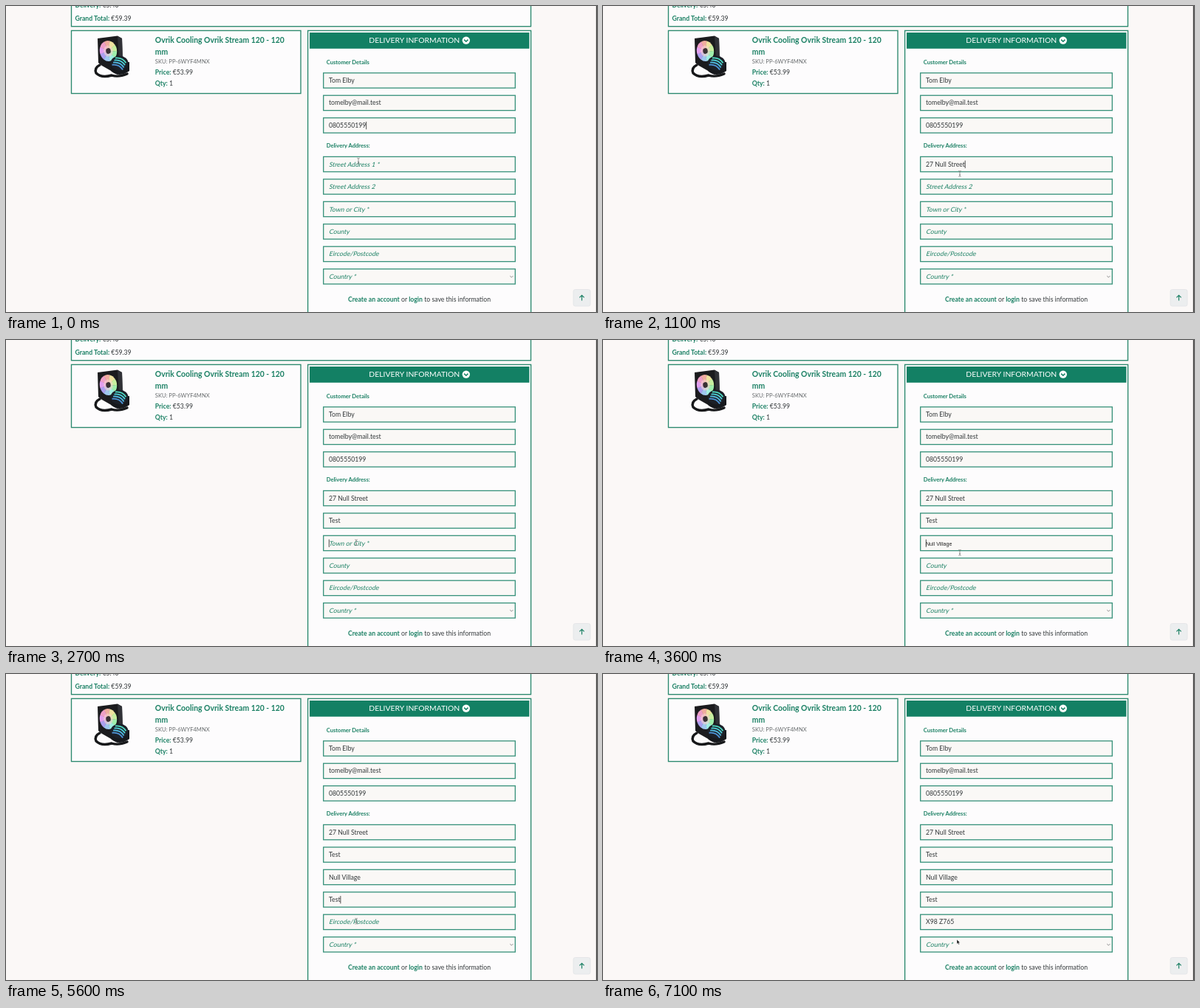
An HTML page for the animation above (8000 ms loop, 800 by 415 pixels).

```html
<!DOCTYPE html>
<html lang="en">
<head>
<meta charset="utf-8">
<title>Checkout form</title>
<style>
  html, body { margin: 0; width: 100%; height: 100%; overflow: hidden; background: #fbf8f7; }
  svg { display: block; width: 100vw; height: 100vh; }
  text { font: 8.7px Lato, sans-serif; fill: #33383a; white-space: pre; }
  .b, .title { font-weight: 700; fill: #1b8064; }
  .title { font-size: 10.4px; }
  .head { font-size: 10.4px; fill: #fff; text-anchor: middle; }
  .small { font-size: 7.6px; }
  .sku { font-size: 7.6px; fill: #686c6e; }
  .hint { fill: #1b8064; }
  .preview { font: 7.1px "Liberation Sans", Arial, sans-serif; fill: #222; }
  .card { fill: #fdfcfd; stroke: #2b896e; stroke-width: 1.35; }
  .input { fill: #faf8f6; stroke: #36917a; stroke-width: 1.3; }
  .caret { stroke: #222; stroke-width: .8; }
</style>
</head>
<body>
<svg viewBox="0 0 800 415" preserveAspectRatio="none">
  <rect width="800" height="415" fill="#fbf8f7"/>
  <rect x="798.8" width="1.2" height="415" fill="#3c3c3c"/>

  <rect class="card" x="88.5" y="-10" width="622" height="37.7"/>
  <text x="93.5" y="2.3"><tspan class="b">Delivery:</tspan> €5.40</text>
  <text x="93.5" y="19.6"><tspan class="b">Grand Total:</tspan> €59.39</text>

  <rect class="card" x="88.5" y="33.4" width="310.5" height="85.2"/>
  <path d="M127 80Q119 84 122 91Q129 98 143 94Q152 97 164 92" fill="none" stroke="#17181a" stroke-width="3.4" stroke-linecap="round"/>
  <path d="M124 44L151 40.5L157 44L158 75L151 93L130 81L125 77Z" fill="#1b1b1e"/>
  <path d="M151 41L157 44L158 75L153 74Z" fill="#303136"/>
  <g id="fan" transform="translate(138.5 61) rotate(-8) scale(.9 1.08)"/>
  <path d="M142 78V88Q153 98 167 88V76Z" fill="#17191d"/>
  <ellipse cx="153.5" cy="77.5" rx="12" ry="10" fill="#1c2028"/>
  <g id="pump" transform="translate(153.5 77.5) rotate(25)" fill="none" stroke-width="1.8"/>

  <text class="title" x="201.8" y="50">Ovrik Cooling Ovrik Stream 120 - 120</text>
  <text class="title" x="201.8" y="65.8">mm</text>
  <text class="sku" x="201.8" y="78.3">SKU: PP-6WYF4MNX</text>
  <text x="201.8" y="93"><tspan class="b">Price:</tspan> €53.99</text>
  <text x="201.8" y="108.2"><tspan class="b">Qty:</tspan> 1</text>

  <rect class="card" x="408.6" y="33.4" width="302" height="400"/>
  <rect x="411" y="36" width="297.4" height="21.8" fill="#138064"/>
  <text class="head" x="552.8" y="50.4">DELIVERY INFORMATION</text>
  <circle cx="622.8" cy="46.6" r="5.2" fill="#fff"/>
  <path d="M620.2 45.6l2.6 2.6l2.6-2.6" fill="none" stroke="#138064" stroke-width="1.5"/>
  <text class="b small" x="433.7" y="78.6">Customer Details</text>
  <text class="b small" x="433.7" y="192.2">Delivery Address:</text>
  <g id="form"></g>
  <path d="M682.2 366l2.1 2.1l2.1-2.1" fill="none" stroke="#777" stroke-width=".8"/>
  <text x="559.5" y="400.5" text-anchor="middle"><tspan class="b">Create an account</tspan> or <tspan class="b">login</tspan> to save this information</text>

  <rect x="768" y="384.5" width="23" height="22.5" rx="2.5" fill="#eceeef" stroke="#e2e4e6" stroke-width=".8"/>
  <path d="M779.5 399.5v-7.2M776.4 395.4l3.1-3.1l3.1 3.1" fill="none" stroke="#1b8064" stroke-width="1.2"/>

  <path id="beam" d="M-1.7-3.8Q0-3.8 0-2.6Q0-3.8 1.7-3.8M0-2.6V2.8M-1.7 4Q0 4 0 2.8Q0 4 1.7 4M-1 1.5H1" fill="none" stroke="#666" stroke-width=".65"/>
  <path id="arrow" d="M0 0V6.2L1.4 4.9L2.4 7.1L3.5 6.6L2.5 4.5H4.4Z" fill="#111" stroke="#fff" stroke-width=".5"/>
</svg>
<script>
const LOOP = 8000, STEP = 100, BLINK = 500;
const LEFT = 437, ROW = 30.45, SELECT_TOP = 356.5;
const NS = 'http://www.w3.org/2000/svg';
const $ = id => document.getElementById(id);

function add(parent, tag, attrs, text) {
  const el = document.createElementNS(NS, tag);
  for (const k in attrs) el.setAttribute(k, attrs[k]);
  if (text) el.textContent = text;
  return parent.appendChild(el);
}
const show = (el, on) => el.setAttribute('visibility', on ? 'visible' : 'hidden');

for (let a = 0; a < 360; a += 40) {
  add($('fan'), 'path', {
    d: 'M0 0L-4.6-12Q0-14 4.6-12Z', fill: `hsl(${a + 10} 72% 78%)`, transform: `rotate(${a})`
  });
}
add($('fan'), 'circle', { r: 7, fill: '#f6d3d0', opacity: .6 });
add($('fan'), 'circle', { r: 3.6, fill: '#3a3034' });
for (let i = 0; i < 4; i++) {
  add($('pump'), 'path', {
    d: `M-8 ${i * 3.4 - 4}Q0 ${i * 3.4 - 9} 8 ${i * 3.4 - 4}`, stroke: `hsl(${170 + i * 13} 65% 58%)`
  });
}

// key times: focus, hover over the suggestion, pick it
const customer = ['Tom Elby', 'tomelby@mail.test', '0805550199'].map(value => ({ value, focus: 0, fill: 0 }));
const address = [
  { hint: 'Street Address 1 *', value: '27 Null Street', focus: 300, hover: 600, fill: 1100 },
  { hint: 'Street Address 2', value: 'Test', focus: 1500, hover: 1800, fill: 2300 },
  { hint: 'Town or City *', value: 'Null Village', focus: 2700, hover: 2900, fill: 3700 },
  { hint: 'County', value: 'Test', focus: 3900, hover: 4800, fill: 5300 },
  { hint: 'Eircode/Postcode', value: 'X98 Z765', focus: 6000, hover: 6200, fill: 6600 },
  { hint: 'Country *', focus: 7100 }
];
customer.forEach((f, i) => f.y = 101 + i * ROW);
address.forEach((f, i) => f.y = 214.6 + i * ROW);
const fields = [...customer, ...address];

fields.forEach((f, i) => {
  const g = $('form'), pos = { x: LEFT, y: f.y + 3 };
  const next = fields[i + 1];
  f.blur = next ? next.focus : LOOP;
  f.untint = f.hover + .4 * (f.fill - f.hover);
  f.box = add(g, 'rect', { class: 'input', x: 429.7, y: f.y - 10.2, width: 259.6, height: 20.4 });
  f.hintEl = add(g, 'text', { class: 'hint', transform: `translate(${LEFT} ${f.y + 3}) skewX(-13)` }, f.hint);
  f.previewEl = add(g, 'text', { ...pos, class: 'preview' }, f.value);
  f.valueEl = add(g, 'text', pos, f.value);
  f.caret = add(g, 'path', { class: 'caret', d: `M0 ${f.y - 5}v10.4` });
});

// The pointer glides to each field, then down to its suggestion.
const moves = [];
let leave = 0;
for (const f of address) {
  const len = Math.min(400, f.focus - leave);
  if (!f.value) {
    moves.push({ at: leave, len, x: 479, y: SELECT_TOP + 3.5 });
    break;
  }
  moves.push({ at: leave, len, x: 474, y: f.y - 1 });
  moves.push({ at: f.focus, len: 300, x: 483, y: f.y + 12.7 });
  leave = f.fill;
}

const easeOut = k => 1 - (1 - k) ** 3;

function pointerAt(t) {
  let x = 477, y = 210;
  for (const m of moves) {
    if (t < m.at) break;
    const k = easeOut(Math.min(1, (t - m.at) / m.len));
    x += (m.x - x) * k;
    y += (m.y - y) * k;
  }
  return { x, y };
}

const isTinted = (f, t) => t >= f.hover && t < f.untint;

function drawField(f, t) {
  const full = t >= f.fill;
  const preview = !full && t >= f.hover;
  const tinted = isTinted(f, t);
  f.box.style.fill = tinted ? '#e8f1f7' : '';
  show(f.hintEl, !full && !preview);
  show(f.previewEl, preview);
  show(f.valueEl, full);

  const since = t - (full ? f.fill : preview ? f.untint : f.focus);
  const focused = f.value && t >= f.focus && t < f.blur;
  show(f.caret, focused && !tinted && since % (2 * BLINK) < BLINK);
  const x = LEFT + .3 + (full ? f.valueEl.getComputedTextLength() : 0);
  f.caret.setAttribute('transform', `translate(${x} 0)`);
}

function render(time) {
  const t = Math.floor(time % LOOP / STEP) * STEP;
  for (const f of fields) drawField(f, t);
  const { x, y } = pointerAt(t);
  const arrow = y > SELECT_TOP || address.some(f => isTinted(f, t));
  for (const id of ['beam', 'arrow']) $(id).setAttribute('transform', `translate(${x} ${y})`);
  show($('arrow'), arrow);
  show($('beam'), !arrow);
}

const start = performance.now();
function tick() {
  render(performance.now() - start);
  requestAnimationFrame(tick);
}
tick();
</script>
</body>
</html>
```
